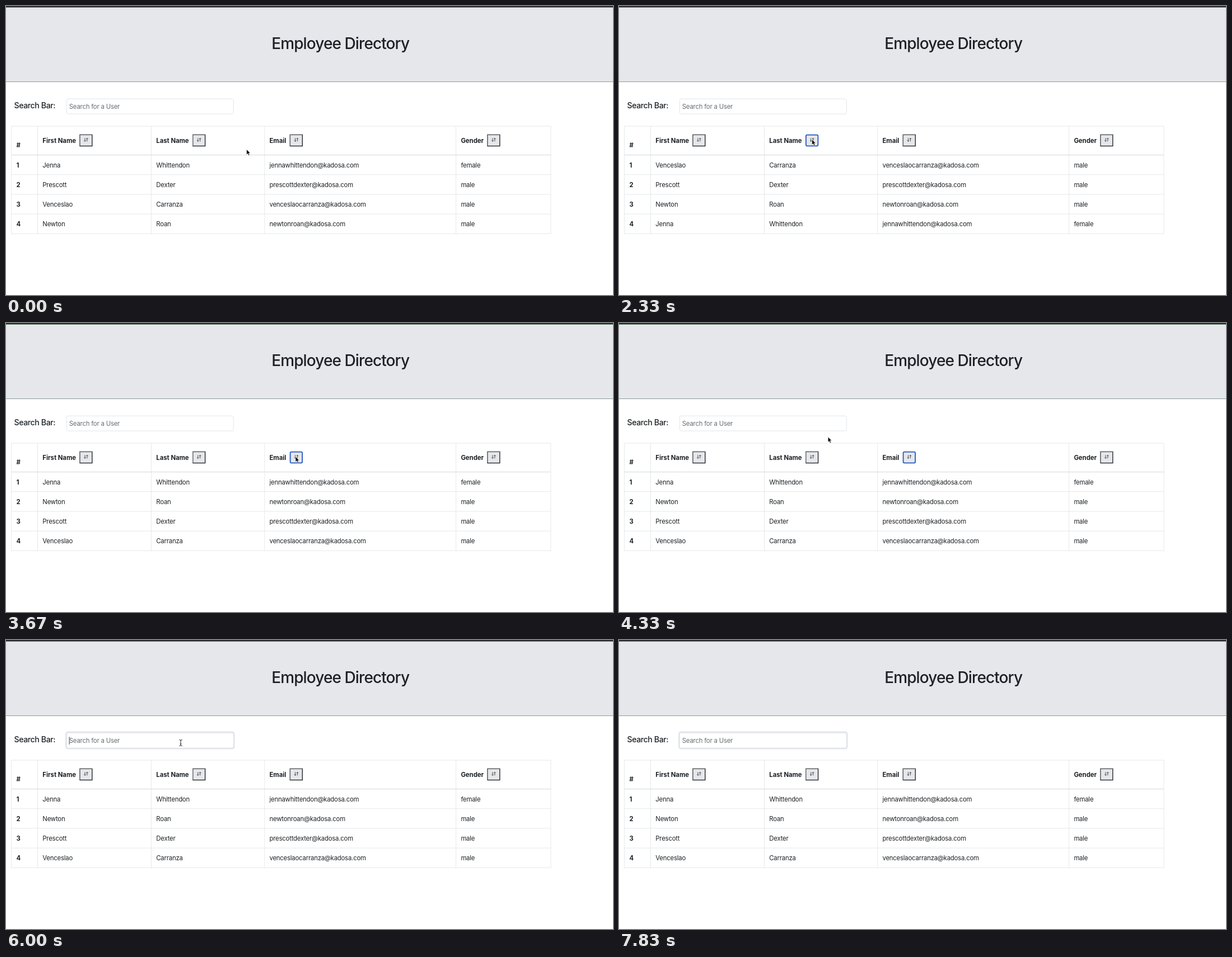
An HTML page that plays this animation: 1084x517 px, repeating every 8000 ms.

```html
<!DOCTYPE html>
<html lang="en">
<head>
<meta charset="utf-8">
<title>Employee Directory</title>
<style>
  html, body { margin: 0; width: 100%; height: 100%; overflow: hidden; background: #fff; }
  svg { display: block; width: 100vw; height: 100vh; }
  text {
    font: 400 11.3px Inter, "Open Sans", sans-serif;
    font-optical-sizing: none;
    letter-spacing: -.18px;
    fill: #1d2125;
  }
  .bold { font-weight: 700; letter-spacing: 0; }
  .title { font-size: 28px; font-weight: 500; letter-spacing: -.9px; }
  .label { font-size: 14.1px; font-weight: 500; letter-spacing: -.4px; }
  .hint { fill: #666d74; }
  .typed { fill: #495057; }
  .grid { fill: none; stroke: #dee2e6; stroke-width: .8; }
  .rule { fill: none; stroke: #dee2e6; stroke-width: 1.5; }
  .icon { fill: none; stroke: #212529; stroke-width: .8; }
</style>
</head>
<body>
<svg viewBox="0 0 1084 517">
  <rect width="1084" height="517" fill="#fff"/>
  <rect y="2" width="1084" height="133" fill="#e6e7eb"/>
  <rect width="1084" height="2" fill="#29242b"/>
  <rect y="1.7" width="1084" height="1" fill="#35663c"/>
  <rect y="135" width="1084" height="1" fill="#8a9c98"/>
  <text class="title" x="597.2" y="76.5" text-anchor="middle">Employee Directory</text>
  <text class="label" x="14.5" y="183">Search Bar:</text>
  <rect id="ring" x="106" y="163.6" width="302.6" height="31.8" rx="4.5" fill="#e2e5eb"/>
  <rect id="box" x="108.4" y="166.2" width="297.8" height="26.8" rx="2.8" fill="#fff" stroke="#dcdfe4" stroke-width=".8"/>
  <text id="query" x="112.8" y="184"></text>
  <rect id="caret" y="173" width=".9" height="14" fill="#333"/>
  <g id="table"></g>
  <path id="arrow" d="M0 0V9.6L2.2 7.6L3.8 11.2L5.5 10.4L3.9 6.9H6.8Z" fill="#000" stroke="#fff" stroke-width=".7"/>
  <path id="beam" d="M-2.6 -5.5Q0 -5.5 0 -4Q0 -5.5 2.6 -5.5M0 -4V4M-2.6 5.5Q0 5.5 0 4Q0 5.5 2.6 5.5M-1.3 2H1.3"
    fill="none" stroke="#222" stroke-width="1"/>
</svg>
<script>
const LOOP = 8000, FPS = 6;
const $ = id => document.getElementById(id);

const people = [
  ["Jenna", "Whittendon", "female"],
  ["Prescott", "Dexter", "male"],
  ["Venceslao", "Carranza", "male"],
  ["Newton", "Roan", "male"]
].map(([first, last, gender]) => ({
  first, last, gender,
  email: (first + last).toLowerCase() + "@kadosa.com"
}));

const cols = [
  { key: "first", name: "First Name" },
  { key: "last", name: "Last Name" },
  { key: "email", name: "Email" },
  { key: "gender", name: "Gender" }
];
// Column edges and button positions, for the full and the filtered table
const wide = { edges: [56.5, 259.5, 461.7, 803.6], buttons: [131.2, 333, 506.7, 859.2] };
const slim = { edges: [57.1, 264.6, 471.3, 800], buttons: [132, 338.1, 516, 855.6] };

const LEFT = 9.6, RIGHT = 973, TOP = 215, HEAD = 266.4, ROW = 35.25;

// Times of the user's actions
const SORT_LAST = 1830, SORT_EMAIL = 3670, FOCUS = 4830, TYPE = 6170, CLEAR = 7500;

const path = [
  [0, 429.6, 256.4], [1167, 344.6, 238.8], [2830, 344.6, 238.8], [3500, 517, 239],
  [4000, 517, 239], [4333, 373.2, 203.7], [4667, 312, 184], [LOOP, 312, 184]
];

function pointer(t) {
  const i = path.findIndex(p => p[0] > t);
  const [t0, x0, y0] = path[i - 1], [t1, x1, y1] = path[i];
  const u = (t - t0) / (t1 - t0), e = u * u * (3 - 2 * u);
  return [x0 + (x1 - x0) * e, y0 + (y1 - y0) * e];
}

const text = (x, y, s, cls = "") => `<text class="${cls}" x="${x}" y="${y}">${s}</text>`;
const line = (cls, d) => `<path class="${cls}" d="${d}"/>`;

function button(x, active) {
  const y = 229.7, w = 23.3, h = 21.5, b = 1.4;
  const edge = active
    ? `<rect x="${x + .9}" y="${y + .9}" width="${w - 1.8}" height="${h - 1.8}" rx="2" fill="#e6e7eb" stroke="#2459c4" stroke-width="1.8"/>`
    : `<rect x="${x}" y="${y}" width="${w}" height="${h}" fill="#26292d"/>
       <path d="M${x} ${y}h${w}l${-b} ${b}h${2 * b - w}v${h - 2 * b}l${-b} ${b}z" fill="#6d6f73"/>
       <rect x="${x + b}" y="${y + b}" width="${w - 2 * b}" height="${h - 2 * b}" fill="#e6e7eb"/>`;
  const c = x + w / 2;
  return edge + line("icon",
    `M${c - 1.9} 236.3v6m-1.8 -1.8l1.8 1.8l1.8 -1.8M${c + 2} 242.3v-6m-1.8 1.8l1.8 -1.8l1.8 1.8`);
}

function table(rows, lay, focus) {
  const bottom = HEAD + ROW * rows.length;
  let out = line("grid", `M${LEFT} ${TOP}H${RIGHT}V${bottom}H${LEFT}Z` +
    lay.edges.map(x => `M${x} ${TOP}V${bottom}`).join("") +
    rows.slice(1).map((_, i) => `M${LEFT} ${HEAD + ROW * (i + 1)}H${RIGHT}`).join(""));
  out += line("rule", `M${LEFT} ${HEAD}H${RIGHT}`) + text(18.6, 253, "#", "bold");
  cols.forEach((c, i) => {
    out += text(lay.edges[i] + 8.8, 244.8, c.name, "bold") + button(lay.buttons[i], focus === c.key);
  });
  rows.forEach((r, n) => {
    const y = HEAD + ROW * n + 22.3;
    out += text(18.6, y, n + 1, "bold");
    cols.forEach((c, i) => { out += text(lay.edges[i] + 8.8, y, r[c.key]); });
  });
  return out;
}

const show = (id, on) => $(id).setAttribute("visibility", on ? "visible" : "hidden");

function caretOn(t) {
  if (t < FOCUS) return false;
  if (t < TYPE) return t < 5330 || t >= 5830;
  return t < 6670 || (t >= 7000 && t < 7830);
}

let last = "";

function draw(time) {
  const step = Math.floor((time % LOOP + 4) * FPS / 1000) % (LOOP * FPS / 1000);
  const t = step * 1000 / FPS + 4;

  const sort = t >= SORT_EMAIL ? "email" : t >= SORT_LAST ? "last" : "";
  const focused = t >= FOCUS;
  const query = t >= TYPE && t < CLEAR ? "j" : "";

  const state = [sort, focused, query].join();
  if (state !== last) {
    last = state;
    const rows = people.filter(p => Object.values(p).some(v => v.toLowerCase().includes(query)));
    if (sort) rows.sort((a, b) => a[sort] < b[sort] ? -1 : 1);
    $("table").innerHTML = table(rows, query ? slim : wide, focused ? "" : sort);
    $("query").textContent = query || "Search for a User";
    $("query").setAttribute("class", query ? "typed" : "hint");
    show("ring", focused);
    $("box").setAttribute("stroke", focused ? "#e2e5eb" : "#dcdfe4");
  }

  show("caret", caretOn(t));
  $("caret").setAttribute("x", query ? 115.4 : 112.6);

  const [x, y] = pointer(t);
  const inBox = y < 193, seen = t < TYPE;
  show("arrow", seen && !inBox);
  show("beam", seen && inBox);
  for (const id of ["arrow", "beam"]) $(id).setAttribute("transform", `translate(${x} ${y})`);
}

function tick(now) {
  draw(now);
  requestAnimationFrame(tick);
}
draw(0);
requestAnimationFrame(tick);
</script>
</body>
</html>
```
